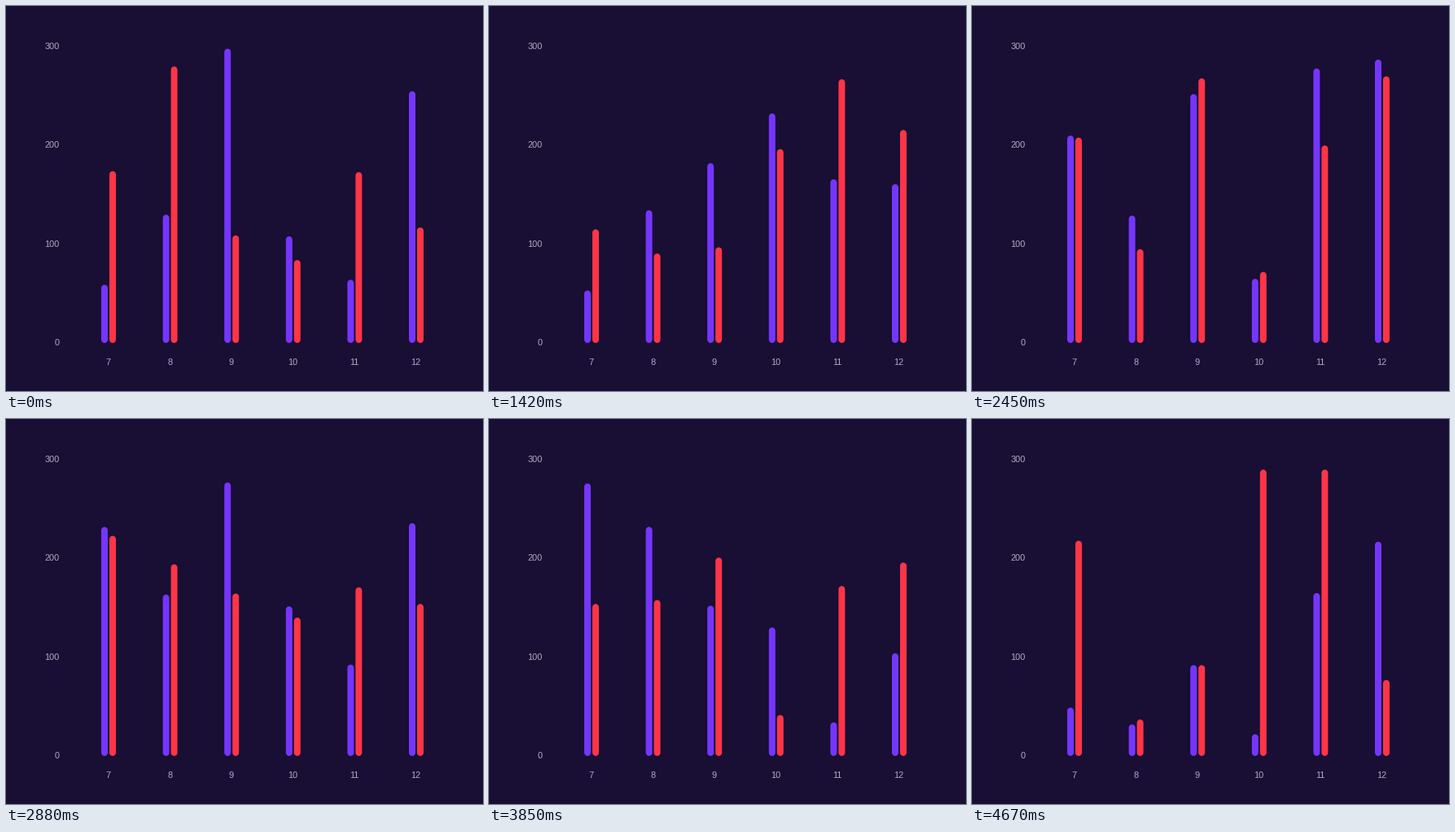
A matplotlib script for the animation above (5.15 s loop, 586 px wide and 473 px high).

```python
import numpy as np
import matplotlib.pyplot as plt
from matplotlib.animation import FuncAnimation
from matplotlib.collections import LineCollection

WIDTH, HEIGHT, DPI = 586, 473, 100
LOOP_MS, STEP_MS, SHUFFLE_MS = 5150, 25, 400
BACKGROUND, PURPLE, RED, LABEL = "#190e34", "#7536fb", "#ff3547", "#afa9bd"
BAR_WIDTH, BASE_Y, UNIT = 8.0, 414.0, 364 / 300
MONTHS, FIRST_X, SPACING = range(7, 13), 126.0, 75.6

# (arrival ms, departure ms, chart values: purple and red for each month)
KEYS = [
    (0, 260, [59, 174, 130, 280, 298, 109, 108, 84, 64, 173, 255, 117]),
    (810, 820, [125, 129, 183, 186, 227, 65, 201, 192, 85, 286, 113, 238]),
    (2000, 2060, [20, 92, 84, 25, 102, 71, 266, 130, 245, 292, 194, 260]),
    (2450, 2450, [210, 208, 129, 95, 252, 268, 65, 72, 278, 200, 287, 270]),
    (3180, 3240, [293, 230, 187, 208, 278, 103, 202, 206, 36, 186, 186, 118]),
    (3870, 4110, [276, 154, 232, 158, 152, 201, 130, 41, 34, 172, 104, 196]),
    (4650, LOOP_MS, [49, 218, 32, 37, 92, 92, 22, 290, 165, 290, 217, 77]),
]


def build_moves():
    """Split long gaps into shuffles that wander between the two keys."""
    rng = np.random.default_rng(7)
    moves = []
    for (_, leave, first), (arrive, _, last) in zip(KEYS, KEYS[1:]):
        count = max(1, round((arrive - leave) / SHUFFLE_MS))
        times = np.linspace(leave, arrive, count + 1)
        poses = np.linspace(first, last, count + 1)
        poses[1:-1] += rng.uniform(-45, 45, poses[1:-1].shape)
        poses = poses.clip(5, 298)
        moves += zip(times, times[1:], poses, poses[1:])
    return moves


def ease(u):
    s = u ** 0.6
    return s * s * (3 - 2 * s)


def values_at(ms):
    values = np.array(KEYS[0][2])
    for start, end, before, after in moves:
        if ms > start:
            values = before + (after - before) * ease(min(1, (ms - start) / (end - start)))
    return values


def points(pixels):
    return pixels * 72 / DPI


moves = build_moves()
fig = plt.figure(figsize=(WIDTH / DPI, HEIGHT / DPI), dpi=DPI, facecolor=BACKGROUND)
ax = fig.add_axes([0, 0, 1, 1])
ax.set_xlim(0, WIDTH)
ax.set_ylim(HEIGHT, 0)
ax.axis("off")


def label(x, y, text, align):
    ax.text(x, y, text, ha=align, va="baseline", color=LABEL,
            family="Liberation Sans", fontsize=points(11))


for value in range(0, 301, 100):
    label(65.8, 417 - value * UNIT, str(value), "right")

bar_x = []
for i, month in enumerate(MONTHS):
    x = FIRST_X + SPACING * i
    label(x - 0.3, 441, str(month), "center")
    bar_x += [x - 5, x + 5]

bars = LineCollection([], colors=[PURPLE, RED] * len(MONTHS),
                      linewidths=points(BAR_WIDTH), capstyle="round", snap=False)
ax.add_collection(bars, autolim=False)


def draw(frame):
    tops = BASE_Y - UNIT * values_at(frame * STEP_MS)
    radius = BAR_WIDTH / 2
    bars.set_segments([[(x, BASE_Y - radius), (x, min(top + radius, BASE_Y - radius - 0.1))]
                       for x, top in zip(bar_x, tops)])
    return (bars,)


animation = FuncAnimation(fig, draw, frames=LOOP_MS // STEP_MS,
                          interval=STEP_MS, repeat=True, repeat_delay=0)
plt.show()
```
